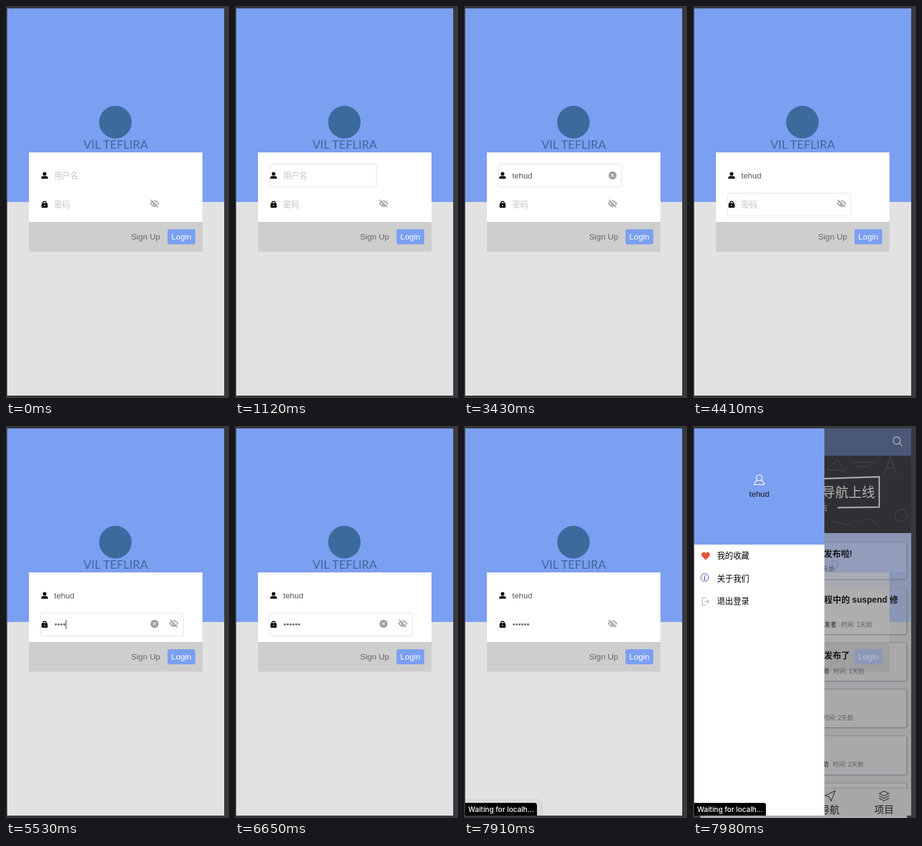
Recreate the animation shown at these times as an HTML page. Size 370 by 648 pixels, loop 8000 ms.

```html
<!DOCTYPE html>
<html lang="zh-CN">
<head>
<meta charset="utf-8">
<title>Login</title>
<style>
html, body { margin: 0; width: 100%; height: 100%; overflow: hidden; background: #39393b; }
svg { display: block; }
text { font: 13.33px "Liberation Sans", "Noto Sans CJK SC", "Noto Sans CJK", sans-serif; }
.label { font-size: 13.6px; }
.hint { fill: #c4c4c4; }
.title { font-size: 14.2px; font-weight: bold; fill: #17171b; }
.meta { font-size: 10px; fill: #5c5b60; }
.tab { font-size: 16px; fill: #1b1b1e; }
.line { fill: none; stroke-linecap: round; stroke-linejoin: round; }
.mid { text-anchor: middle; }
</style>
</head>
<body>
<svg width="370" height="648" viewBox="0 0 370 648">
  <defs>
    <g id="clear">
      <circle r="6.6" fill="#9b9b9b"/>
      <path class="line" d="M-2.2-2.2 2.2 2.2M2.2-2.2-2.2 2.2" stroke="#fff" stroke-width="1.2"/>
    </g>
    <g id="eyeOff" class="line" stroke="#999" stroke-width="1.5">
      <path d="M-6.6 0Q-3.6-4.6 0-4.6T6.6 0Q3.6 4.6 0 4.6T-6.6 0Z"/>
      <circle r="2.2"/>
      <path d="M-4.4-6.2 6.2 5" stroke="#fff" stroke-width="2"/>
      <path d="M-5.6-5.6 5.4 5.6"/>
    </g>
  </defs>

  <g id="login">
    <path d="M2 4H362V324H2Z" fill="#7b9ff1"/>
    <path d="M2 324H362V644H2Z" fill="#e2e2e2"/>
    <circle cx="181.5" cy="192" r="27" fill="#3b6a9c"/>
    <text class="mid" x="182" y="236" style="font:19.5px Lato,sans-serif" fill="#3b6a9c">VIL TEFLIRA</text>
    <path d="M38 242H326V357H38Z" fill="#fff"/>
    <path d="M38 357H326V406H38Z" fill="#cecece"/>
    <rect id="box" x="57.5" height="37.5" rx="2" fill="#fff" stroke="#e4e0e3"/>
    <circle cx="64" cy="277.6" r="3"/>
    <path d="M58.5 285.6V284Q58.5 281.4 61.5 281.2H66.5Q69.5 281.4 69.5 284V285.6Z"/>
    <rect x="59" y="326" width="10" height="7.6" rx="1.4"/>
    <path class="line" d="M61.3 327V325.6A2.7 2.7 0 0 1 66.7 325.6V327" stroke="#000" stroke-width="1.5"/>
    <circle cx="64" cy="329.6" r="1" fill="#fff"/>
    <text id="name" x="80" y="285" fill="#555"></text>
    <text id="nameHint" class="hint" x="80" y="285">用户名</text>
    <text id="passHint" class="hint" x="80" y="333">密码</text>
    <g id="dots" fill="#666"></g>
    <rect id="caret" width="1" height="15" fill="#333"/>
    <use id="wipe" href="#clear" x="246.5"/>
    <use id="eye" href="#eyeOff" y="326.5"/>
    <text class="label" x="207.5" y="386" fill="#666">Sign Up</text>
    <rect id="button" x="268" y="369" width="46" height="25" rx="3"/>
    <text class="label mid" x="291" y="386" fill="#fff">Login</text>
  </g>

  <g id="home">
    <path d="M2 4H362V644H2Z" fill="#a4a3a5"/>
    <path d="M2 4H362V49H2Z" fill="#4a5777"/>
    <g class="line" stroke="#b9bcc6" stroke-width="1.3">
      <circle cx="338" cy="24" r="6"/><path d="M342.5 28.5 347 33"/>
    </g>
    <path d="M2 49H362V177H2Z" fill="#303034"/>
    <g class="line" stroke="#4b4b50">
      <path d="M316 82 327 50 338 82M320 70H334M323 61H331M222 72 240 56 252 74ZM266 60H300M270 67H292M230 158 262 164M275 160Q290 146 304 161"/>
      <circle cx="345" cy="148" r="10"/>
    </g>
    <path class="line" d="M218 87 309 84V134L241 135" stroke="#aaa9ab" stroke-width="2.4"/>
    <text x="214" y="117" style="font-size:22px" fill="#b4b3b5">导航上线</text>
    <text x="213" y="140" style="font-size:10px" fill="#aaa">页</text>
    <path d="M2 177H362V324H2Z" fill="#8996b6"/>
    <g id="cards" stroke="#77767b" stroke-opacity=".75"></g>
    <path d="M2 242H326V357H2Z" fill="#b0afb1" fill-opacity=".8"/>
    <path d="M2 357H326V406H2Z" fill="#9d9c9e" fill-opacity=".7"/>
    <g id="edges" class="line" stroke="#77767b" stroke-opacity=".6"></g>
    <text x="228" y="236" style="font:19px Lato,sans-serif" fill="#7887a5">D</text>
    <text class="title" x="217" y="216">发布啦!</text>
    <text class="meta" x="215" y="240">天前</text>
    <text class="title" x="217.5" y="292">程中的 suspend 修</text>
    <use href="#eyeOff" x="246.5" y="326.5" opacity=".3"/>
    <text class="meta" x="218" y="332" style="fill:#1e1e22">发者</text>
    <text class="meta" x="246" y="332">时间: 1天前</text>
    <text class="title" x="217.5" y="384">发布了</text>
    <rect x="268" y="369" width="46" height="25" rx="3" fill="#8a98b8"/>
    <text class="label mid" x="291" y="386" fill="#c0c3cb">Login</text>
    <text class="meta" x="216" y="409" style="fill:#1e1e22">助</text>
    <text class="meta" x="233" y="409">时间: 1天前</text>
    <text class="meta" x="215" y="486">时间: 2天前</text>
    <text class="meta" x="215" y="563" style="fill:#1e1e22">助</text>
    <text class="meta" x="232" y="563">时间: 2天前</text>
    <path d="M2 598H362V644H2Z" fill="#a7a6a8"/>
    <path d="M2 598.5H362" stroke="#8c8b8e"/>
    <g class="line" stroke="#2c2c30" stroke-width="1.1">
      <path d="M236 603 219 611 226 613 229 620Z"/>
      <path d="M317 603.5 325 607.5 317 611.5 309 607.5ZM309 611.5 317 615.5 325 611.5M309 615.5 317 619.5 325 615.5"/>
    </g>
    <text class="tab" x="211" y="640">导航</text>
    <text class="tab" x="301" y="640">项目</text>

    <path d="M2 4H218V644H2Z" fill="#fff"/>
    <path d="M2 4H218V196H2Z" fill="#7b9ff1"/>
    <g class="line" stroke="#fff" stroke-width="1.3">
      <circle cx="110" cy="85.5" r="4.8"/>
      <path d="M102 96.8Q102.5 91 107 90.2M113 90.2Q117.500 91 118 96.800H102"/>
    </g>
    <text class="mid" id="owner" x="110" y="117" fill="#16161c"></text>
    <path d="M21 221.500 15 215.500C11.500 211 17.500 205.500 21 210.500C24.500 205.500 30.500 211 27 215.500Z" fill="#e4573d"/>
    <g class="line" stroke="#4a4fb5">
      <circle cx="19.500" cy="250.500" r="6.500"/>
      <path d="M20 246.700V247M18.800 249.500H19.800L19 254H20.200" stroke-width="1.300"/>
    </g>
    <path class="line" d="M22 284H15.500V296H22M19 290H26M23.500 287.300 26.200 290 23.500 292.700" stroke="#aaa" stroke-width="1.100"/>
    <text x="40" y="219">我的收藏</text>
    <text x="40" y="257">关于我们</text>
    <text x="40" y="294">退出登录</text>
  </g>

  <g id="status">
    <path id="halo" d="M2 616H120Q131 617 131 630V644H2Z" fill="#d9d9d9"/>
    <path d="M2 623H117Q121 623 121 627V644H2Z"/>
    <text x="7" y="638" style="font:500 11.8px Inter,sans-serif" fill="#fff">Waiting for localh...</text>
  </g>
</svg>
<script>
const el = id => document.getElementById(id);
const set = (id, attrs) => { for (const k in attrs) el(id).setAttribute(k, attrs[k]); };
const show = (id, on) => el(id).style.display = on ? "" : "none";
const within = (t, spans) => spans.some(([a, b]) => t >= a && t < b);
const count = (t, times) => times.filter(x => t >= x).length;

const LOOP = 8000, USER = "tehud", DOT = 4.7;
const nameKeys = [2170, 2380, 2520, 2730, 2870];
const passKeys = [4550, 4830, 5180, 5530, 5810, 6160];
const caretOn = [[350, 840], [1400, 1890], [2170, 3430], [3850, 4410], [4550, 6650]];

el("owner").textContent = USER;
el("dots").innerHTML = passKeys.map((_, i) =>
  `<circle cx="${82.7 + i * DOT}" cy="328" r="1.8"/>`).join("");

const cards = [[192, 62], [267, 78], [358, 64], [435, 64], [512, 65], [590, 60]];
el("cards").innerHTML = cards.map(([y, h], i) =>
  `<rect x="12" y="${y}" width="343" height="${h}" rx="4" fill="${i ? "#a9a8aa" : "#919dba"}"/>`).join("") +
  '<path d="M326 268H354V324H326ZM326 242H362V253H326Z" fill="#8996b6" stroke="none"/>';
el("edges").innerHTML = cards.map(([y, h]) =>
  `<path d="M14 ${y + h}H351Q355 ${y + h} 355 ${y + h - 4}V${y + 4}" stroke-width="1.5"/>`).join("");

function draw(t) {
  const typed = count(t, nameKeys), dots = count(t, passKeys);
  const onName = t >= 350 && t < 3850, onPass = t >= 3850 && t < 7070;
  const wide = onPass && dots > 0;
  const right = onName ? (typed ? 262 : 235) : wide ? 295 : 262;

  show("login", t < 7980);
  show("home", t >= 7980);
  show("status", t >= 7910);
  show("halo", t < 7980);

  show("box", onName || onPass);
  set("box", { y: onName ? 261.5 : 309.5, width: right - 58 });
  el("name").textContent = USER.slice(0, typed);
  show("nameHint", !typed);
  show("passHint", !dots);
  [...el("dots").children].forEach((d, i) => d.style.display = i < dots ? "" : "none");

  const offset = onName ? (typed && t < 7980 ? el("name").getComputedTextLength() : 0) : dots * DOT;
  show("caret", within(t, caretOn));
  set("caret", { x: Math.round(80 + offset), y: onName ? 273 : 320.5 });

  show("wipe", onName && typed || wide);
  set("wipe", { y: onName ? 280 : 327 });
  set("eye", { x: wide ? 278.5 : 246.5 });
  set("button", { fill: t >= 7070 && t < 7210 ? "#7497e4" : "#7b9ff1" });
}

function tick() {
  draw(performance.now() % LOOP);
  requestAnimationFrame(tick);
}
tick();
</script>
</body>
</html>
```
